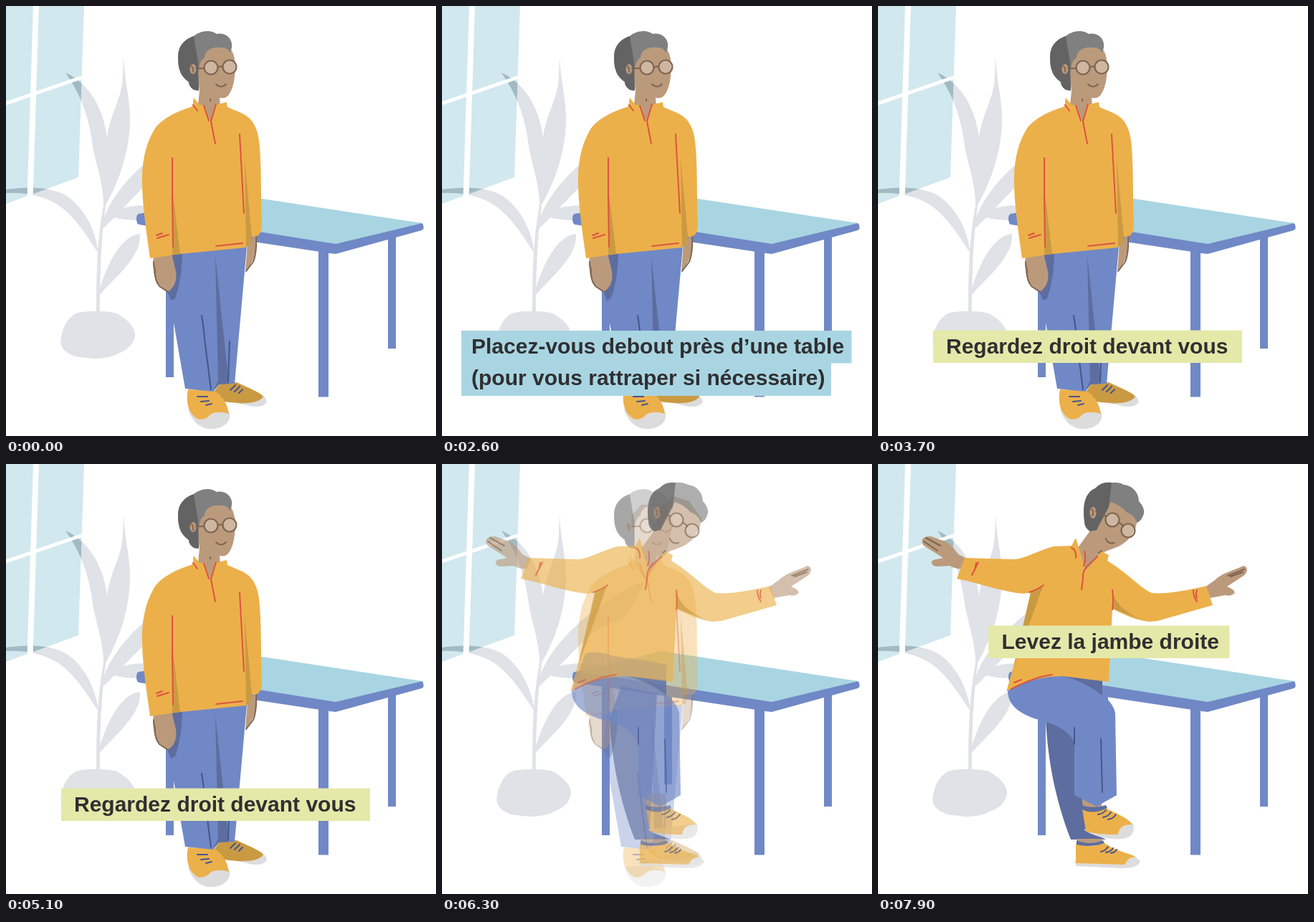
Write an HTML page that moves like this. It is 600 px wide and 600 px high and loops after 8000 ms.

```html
<!DOCTYPE html>
<html lang="fr">
<head>
<meta charset="utf-8">
<title>Exercice d’équilibre</title>
<style>
html, body { margin: 0; width: 100%; height: 100%; overflow: hidden; background: #fff; }
svg { display: block; width: 100vw; height: 100vh; }

.plant { fill: #dfe2e7; }
.shade { fill: #a1bac3; }
.blue { fill: #7088c6; }
.navy { fill: #5d6d9f; }
.top { fill: #a9d5e2; }
.skin { fill: #bb9a7c; }
.hair { fill: #808080; }
.dark { fill: #636363; }
.shirt { fill: #ecb04a; }
.fold { fill: #ca9a42; }
.sole { fill: #dcdcdc; }
.line { fill: none; stroke-width: 2; stroke-linecap: round; stroke-linejoin: round; }
.red { stroke: #dc5440; }
.ink { stroke: #46568c; }
.brown { stroke: #7d6552; }
.lens { fill: #fff; fill-opacity: .28; stroke: #7d6552; stroke-width: 2.2; }
text { font: bold 30px "Liberation Sans", Arial, sans-serif; fill: #2f2f31; }
.lime { fill: #e4e9a9; }

/* every part of a pose dissolves on its own, captions cut */
#stand > * { animation: leave 8s linear infinite; }
#balance > * { animation: arrive 8s linear infinite; }
.caption { opacity: 0; animation: 8s step-end infinite; }
#place { animation-name: place; }
#look { animation-name: look; }
#lift { animation-name: lift; }
@keyframes leave { 0%, 75.6% { opacity: 1; } 80.6%, 100% { opacity: 0; } }
@keyframes arrive { 0%, 75.6% { opacity: 0; } 80.6%, 100% { opacity: 1; } }
@keyframes place { 0% { opacity: 0; } 5% { opacity: 1; } 37.5%, 100% { opacity: 0; } }
@keyframes look { 0% { opacity: 0; } 41.25% { opacity: 1; } 77.5%, 100% { opacity: 0; } }
@keyframes lift { 0% { opacity: 0; } 85%, 100% { opacity: 1; } }
</style>
</head>
<body>
<svg viewBox="0 0 600 600">
  <defs>
    <path id="pane" d="M0 0H109L101 239 0 276Z"/>
    <clipPath id="glass"><use href="#pane"/></clipPath>
    <g id="leaves">
      <path d="M83 93C112 106 136 138 141 184C145 150 162 130 163 98L164 70C165 105 174 130 173 163C171 215 152 255 136 283C137 250 126 225 121 195C116 155 105 125 83 93Z"/>
      <path d="M0 256C35 251 62 253 83 264C107 279 125 310 129 345C112 320 98 296 75 279C52 264 25 260 0 261Z"/>
    </g>
  </defs>

  <!-- room -->
  <use href="#pane" fill="#d1e8ee"/>
  <g class="plant">
    <use href="#leaves"/>
    <path d="M133 308C142 270 172 238 200 214C225 195 255 172 282 164C268 200 250 222 235 222C205 232 165 283 135 311Z"/>
    <path d="M134 300C150 282 172 278 200 278C218 278 230 282 240 290C215 300 175 302 146 294Z"/>
    <path d="M187 318C166 320 146 345 130 397L130 404C150 380 190 350 187 318Z"/>
    <path d="M126 430C126 375 127 325 136 278L139 280C133 320 131 375 131 430Z"/>
    <path d="M100 428C118 425 140 425 155 429C168 437 179 446 180 458C180 470 170 480 158 484C148 490 135 492 122 492C110 490 98 491 92 487C80 482 74 473 77 463C79 447 88 432 100 428Z"/>
  </g>
  <use href="#leaves" class="shade" clip-path="url(#glass)"/>
  <path d="M42 -2L33.5 268" stroke="#fff" stroke-width="8"/>
  <path d="M0 136L106 99.500" stroke="#fff" stroke-width="5"/>
  <g class="blue">
    <path d="M223 296h11V518h-11ZM310 300h11V447h-11ZM436 338h14V545.500h-14ZM533 316h11V478h-11Z"/>
    <path d="M185 290L305 272 580 303Q583 304 582.500 311L580 313 460 346 452 345 186 305Q182 304 182 297Q182 291 185 290Z"/>
  </g>
  <path class="top" d="M195 290L305 261 581 303 460 332Z"/>

  <!-- standing -->
  <g id="stand">
    <path class="sole" d="M300 549L345 559Q361 560 364 552Q362 545 355 541Z"/>
    <path class="fold" d="M289 540L298 527 322 525C338 533 355 539 359 545C353 555 330 556 305 552Z"/>
    <path class="sole" d="M254 562C259 581 274 592 290 590C305 588 314 580 312 568L290 560Z"/>
    <path class="shirt" d="M254 535C250 552 255 572 270 577Q280 577 285 570Q296 564 311 569C309 554 300 541 290 537Z"/>
    <path class="line ink" d="M267 545l14 0M272 552l11-1M279 557l8-2M313 536l7-7M319 538l7-7M325 540l5-5"/>
    <path class="blue" d="M228 345L336 336 319 527 297 528 289 538 250 534 234 442Z"/>
    <path class="navy" d="M292 349L311 527 297 528 289 538 296 522ZM230 347L246 344C246 370 241 395 236 408L230 411 225 398Z"/>
    <path class="line ink" d="M273 432Q276 450 277 464L286 535M312 468L310 524"/>
    <path class="skin" d="M206 349C204 365 206 378 211 387L225 399C235 394 239 382 237 370L231 345ZM337 330L350 318C350 342 347 356 334 370Z"/>
    <path class="line brown" d="M206 357Q206 364 208 368Q207 382 214 391L226 399M349 322Q350 345 345 357L335 370"/>
    <path class="skin" d="M264 72L278 57 310 56C317 62 320 73 320 86C319 104 317 116 310 125Q305 130 298 128L299 140 286 164 268 138 270 118Z"/>
    <path class="hair" d="M240 72C240 56 248 47 262 42C270 35 285 32 294 39C305 37 313 43 315 52Q316 60 312 65Q309 57 300 58C286 56 277 63 277 72C270 76 270 85 268 93L269 118 262 117Q255 112 255 106C245 99 240 90 240 72Z"/>
    <path class="dark" d="M240 72C240 56 248 47 262 42L268 78 269 118 262 117Q255 112 255 106C245 99 240 90 240 72Z"/>
    <ellipse class="skin" cx="261" cy="88" rx="4.500" ry="7"/>
    <path class="line brown" d="M259 84Q262 87 261 92"/>
    <g class="lens"><circle cx="286" cy="86" r="9.500"/><circle cx="312" cy="85" r="9.500"/></g>
    <path class="line brown" d="M265 87H276M296 86Q299 83 302 85M293 109Q300 116 307 109M285 130v2"/>
    <path class="shirt" d="M262 128L270 138 276 138 285 161 292 138 308 134 309 141 330 150C344 157 351 170 353 188C357 220 355 260 357 305Q357 321 346 322L336 322 335 337 243 346 201 352C196 315 191 285 190 250C189 220 194 195 206 174C214 159 238 147 258 141Q262 139 261 133Z"/>
    <path class="fold" d="M233 262L243 346 232 347ZM333 212L343 322 339 335 335 336Z"/>
    <path class="line red" d="M232 212L232 270 233 336M326 179L332 289M276 139L283 160M293 137L286 161 292 192M261 138L267 146M293 335L330 331M210 320L218 317M211 324L227 319"/>
  </g>

  <!-- balancing -->
  <g id="balance">
    <path class="navy" d="M234 355L250 310 300 320 290 510 318 524 269 524C249 472 237 418 234 355Z"/>
    <path class="skin" d="M278 523H312V532H278ZM284 460H312V480H286Z"/>
    <path class="sole" d="M275 553L276 561 340 564Q364 564 366 554L358 547Z"/>
    <path class="shirt" d="M276 530Q295 537 316 529C332 540 350 543 360 548Q349 548 344 559L276 557Z"/>
    <path class="navy" d="M277 525Q295 533 314 525L316 529Q296 536 277 531Z"/>
    <path class="sole" d="M287 510C300 520 325 525 342 523Q360 520 356 502Z"/>
    <path class="shirt" d="M285 481Q300 485 316 479C332 488 350 494 355 503Q337 502 335 517C315 517 300 516 290 512Z"/>
    <path class="navy" d="M284 476Q300 482 318 476L320 480Q300 490 285 482Z"/>
    <path class="line ink" d="M307 489Q314 488 318 483M314 493Q321 492 325 486M321 496Q328 495 332 489M311 541Q317 540 321 534M318 542Q325 541 328 536M325 543Q331 542 333 538"/>
    <path class="blue" d="M181 318C182 338 200 350 225 357C245 362 264 370 274 388L274 462 305 478 333 462 331 347C328 334 318 326 313 322L313 280C290 274 265 272 240 268C222 262 205 260 199 266C193 285 186 300 181 318Z"/>
    <path class="navy" d="M256 296L313 301 313 323Q285 301 256 296Z"/>
    <path class="line ink" d="M274 368V391M311 384L313 458"/>
    <path class="skin" d="M124 132L112 126C106 117 98 108 88 106L74 101C63 100 58 107 64 114L91 131 77 134C72 138 76 143 83 143L100 142Q108 147 118 146ZM456 172L470 162C480 152 495 149 510 142C517 143 516 152 510 156L487 171Q500 176 497 181Q491 185 485 183L463 187Z"/>
    <path class="line brown" d="M67 103L87 114M64 108L83 121M488 156L511 147M492 157L509 151"/>
    <path class="skin" d="M300 65L324 45 345 52 362 76C360 96 350 106 341 112C332 118 322 119 314 124L290 149 278 118 296 93Z"/>
    <path class="hair" d="M288 80C285 57 289 40 303 34Q312 24 326 26Q336 25 343 29C355 30 364 40 364 52C370 58 373 66 370 72Q367 80 361 82C359 73 352 69 346 67Q340 58 325 53L312 75 305 92 296 94Q288 89 288 80Z"/>
    <path class="dark" d="M288 80C285 57 289 40 303 34Q312 24 326 26L322 60 305 92 296 94Q288 89 288 80Z"/>
    <ellipse class="skin" cx="300" cy="68" rx="4.500" ry="8"/>
    <path class="line brown" d="M298 63Q302 66 299 72"/>
    <g class="lens"><circle cx="327" cy="78" r="9.500"/><circle cx="349" cy="93" r="9.500"/></g>
    <path class="line brown" d="M304 66L318 73M336 82Q340 83 342 87M318 104Q320 112 330 110M308 124L312 121"/>
    <path class="shirt" d="M276 103L270 114 245 115C225 120 205 132 190 133L121 131 110 160C145 167 175 179 203 181L214 179C207 215 193 270 179 318C195 306 220 297 258 296L322 304 327 202C345 211 360 218 378 220L390 219 467 197 458 170C430 177 398 182 382 180C366 173 348 152 320 135L322 127 312 122 290 149Z"/>
    <path class="fold" d="M213 179L230 171 189 284ZM327 178C331 194 344 206 367 217L328 202Z"/>
    <path class="line red" d="M270 117Q277 120 276 131M288 122Q291 132 287 142M306 129C296 140 284 145 286 160L284 175M211 179Q223 175 231 169M327 176Q329 190 327 203M140 137L131 155M137 138L135 148M440 176Q440 185 445 192M445 176Q443 182 445 187M186 314C205 304 225 296 243 294M190 305L200 301"/>
  </g>

  <!-- captions -->
  <g id="place" class="caption">
    <path class="top" d="M27 453H571.500V498.500H543V544H27Z"/>
    <text x="41" y="484.500">Placez-vous debout près d’une table</text>
    <text x="41" y="529">(pour vous rattraper si nécessaire)</text>
  </g>
  <g id="look" class="caption">
    <path class="lime" d="M77 452.500H508V498H77Z"/>
    <text x="95" y="484.500">Regardez droit devant vous</text>
  </g>
  <g id="lift" class="caption">
    <path class="lime" d="M154 225.500H490.500V271H154Z"/>
    <text x="172.500" y="257.500">Levez la jambe droite</text>
  </g>
</svg>
</body>
</html>
```
